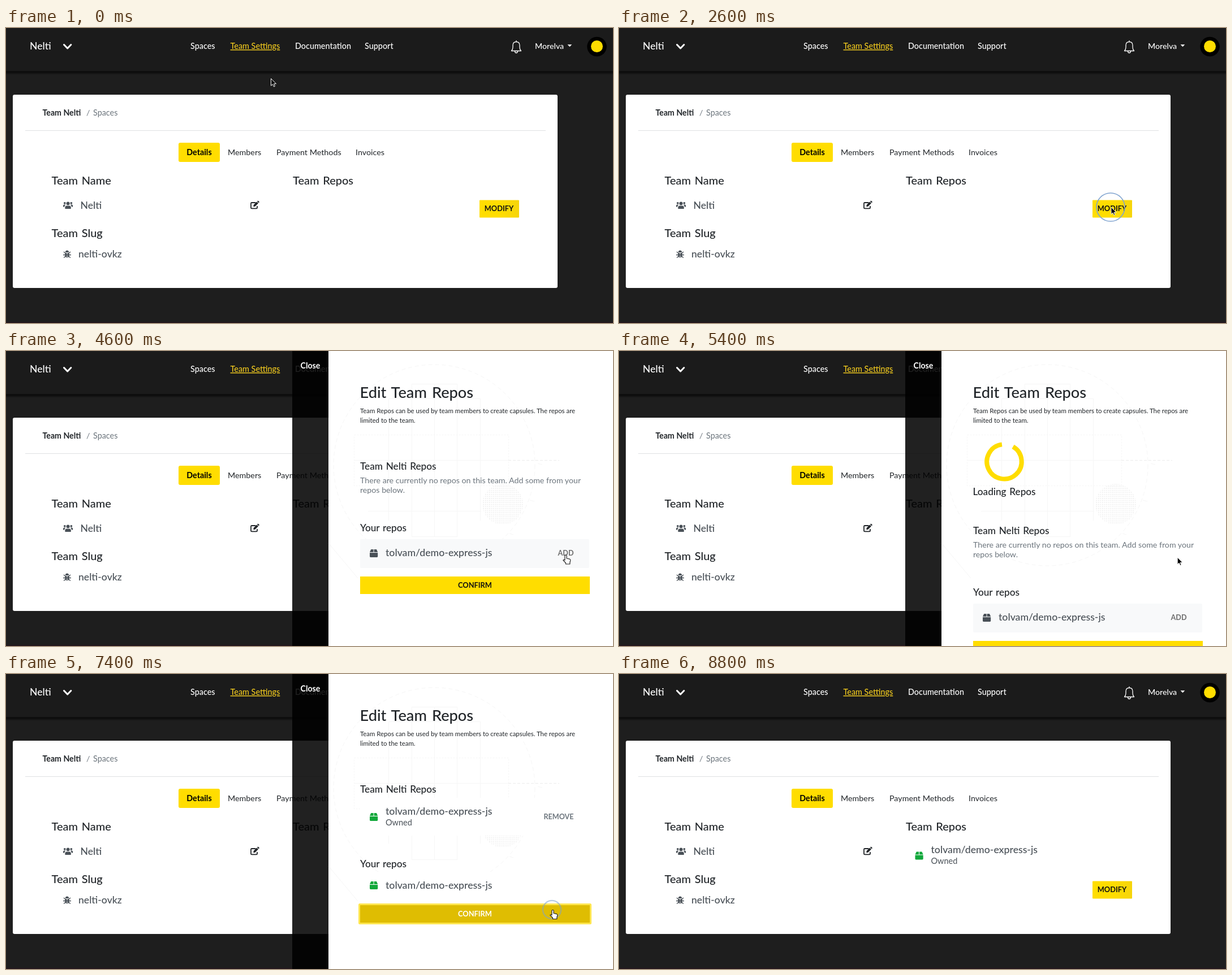
Recreate the animation shown at these times as an HTML page. Size 1073 px wide and 522 px high, loop 9000 ms.

```html
<!DOCTYPE html>
<html lang="en">
<head>
<meta charset="utf-8">
<title>Team repos</title>
<style>
html, body { margin: 0; width: 100%; height: 100%; overflow: hidden; background: #1e1e1e; }
svg { display: block; width: 100%; height: 100%; font-family: Lato, "Open Sans", sans-serif; }
text { white-space: pre; }
</style>
</head>
<body>
<svg id="stage" viewBox="0 0 1073 522"></svg>
<script>
const LOOP = 9000;
const TEAM = "Nelti", REPO = "tolvam/demo-express-js";
const YELLOW = "#ffdd00", INK = "#212529", SLATE = "#495057", GREEN = "#12a83b";
const stage = document.getElementById("stage");

function add(parent, tag, attrs) {
  const node = document.createElementNS("http://www.w3.org/2000/svg", tag);
  for (const key in attrs) node.setAttribute(key, attrs[key]);
  parent.appendChild(node);
  return node;
}
const group = (parent, attrs) => add(parent, "g", attrs);
const rect = (parent, x, y, width, height, fill, more) =>
  add(parent, "rect", { x, y, width, height, fill, ...more });
const path = (parent, d, more) => add(parent, "path", { d, ...more });
const circle = (parent, cx, cy, r, more) => add(parent, "circle", { cx, cy, r, ...more });
function text(parent, x, y, size, str, fill, more) {
  const node = add(parent, "text", { x, y, "font-size": size, fill, ...more });
  node.textContent = str;
  return node;
}
const MEDIUM = { "font-weight": 500 }, BOLD = { "font-weight": 700 };
const MID_BOLD = { "font-weight": 700, "text-anchor": "middle" };

const heading = (parent, x, y, size, str, more) =>
  text(parent, x, y, size, str, INK, { "word-spacing": size * 0.08, ...MEDIUM, ...more });
const show = (node, on) => node.setAttribute("display", on ? "inline" : "none");
const move = (node, x, y) => node.setAttribute("transform", `translate(${x} ${y})`);

function box(parent, x, y, fill) {
  path(parent, "M2.2 0H6.6V5H0ZM7.6 0H12L14.2 5H7.6ZM0 6H14.2V12.6Q14.2 14 12.8 14H1.4Q0 14 0 12.6Z",
    { fill, transform: `translate(${x} ${y})` });
}

function spinner(parent, cx, cy) {
  const r = 30.7, a = 19 * Math.PI / 180;
  const x = r * Math.sin(a), y = -r * Math.cos(a);
  const g = group(parent, { transform: `translate(${cx} ${cy})` });
  return path(g, `M${x} ${y}A${r} ${r} 0 1 1 ${-x} ${y}`,
    { fill: "none", stroke: YELLOW, "stroke-width": 8 });
}

const defs = add(stage, "defs", {});
const shade = add(defs, "linearGradient", { id: "shade" });
add(shade, "stop", { offset: 0.5, "stop-color": YELLOW });
add(shade, "stop", { offset: 1, "stop-color": "#f6d50c" });
const dots = add(defs, "pattern", { id: "dots", width: 3.6, height: 3.6, patternUnits: "userSpaceOnUse" });
circle(dots, 1.8, 1.8, 0.7, { fill: "#d6d6d6" });

// Page header
rect(stage, 0, 0, 1073, 522, "#1e1e1e");
rect(stage, 0, 0, 1073, 76, "#1b1b1b");
rect(stage, 0, 76, 1073, 4, "#0e0e0e");
rect(stage, 0, 80, 1073, 2, "#181818");
rect(stage, 0, 520, 1073, 2, "#23161b");
text(stage, 42, 38, 17.6, TEAM, "#fff", MEDIUM);
path(stage, "M102.5 29.5L108.7 36L114.9 29.5",
  { fill: "none", stroke: "#fff", "stroke-width": 3, "stroke-linecap": "round", "stroke-linejoin": "round" });
text(stage, 326, 37, 14.4, "Spaces", "#fff", MEDIUM);
text(stage, 396.5, 37, 14.4, "Team Settings", "#f0c91e", { ...MEDIUM, "text-decoration": "underline" });
text(stage, 511, 37, 14.4, "Documentation", "#fff", MEDIUM);
text(stage, 634, 37, 14.4, "Support", "#fff", MEDIUM);
path(stage, "M893.5 40.5Q896 38 896 34V30.5Q896 24.5 902 24.5Q908 24.5 908 30.5V34Q908 38 910.5 40.5ZM902 24.5V22M899.5 41Q899.5 44 902 44Q904.5 44 904.5 41",
  { fill: "none", stroke: "#fff", "stroke-width": 1.3, "stroke-linejoin": "round" });
text(stage, 935, 37, 14.2, "Morelva", "#fff", MEDIUM);
path(stage, "M992.5 29.3H1000.3L996.4 33.3Z", { fill: "#fff" });
circle(stage, 1044.5, 33, 17.3, { fill: "#000" });
circle(stage, 1044.5, 32.5, 10.5, { fill: YELLOW });

// Team card
const card = rect(stage, 12, 118, 963, 342, "#fff", { rx: 3 });
text(stage, 64.5, 154.5, 14.2, "Team " + TEAM, INK, BOLD);
text(stage, 142, 154.5, 14.3, "/", "#6c757d");
text(stage, 154, 154.5, 14.4, "Spaces", "#6c757d");
rect(stage, 34, 181, 920, 1, "#dfe1e3");
rect(stage, 305, 203, 73, 34, YELLOW, { rx: 3 });
text(stage, 341.5, 224.5, 14.3, "Details", "#000", MID_BOLD);
[[392, "Members"], [478, "Payment Methods"], [618, "Invoices"]]
  .forEach(([x, label]) => text(stage, x, 224.5, 14.3, label, INK));
heading(stage, 80.5, 277, 20, "Team Name");
heading(stage, 80.5, 369.5, 20, "Team Slug");
heading(stage, 507, 277, 20, "Team Repos");
text(stage, 131.5, 319.5, 17.6, TEAM, SLATE, MEDIUM);
text(stage, 128, 405.5, 17.6, "nelti-ovkz", SLATE, MEDIUM);

const users = group(stage, { fill: SLATE });
circle(users, 109.6, 310.5, 3);
circle(users, 103.8, 309.8, 1.9);
circle(users, 115.4, 309.8, 1.9);
path(users, "M104.4 320V317.5Q104.4 314.5 107.4 314.5H111.8Q114.8 314.5 114.8 317.5V320ZM101 316.5V314.5Q101 312.5 103 312.5H105.5Q103.5 314 103.3 316.5ZM118.2 316.5V314.5Q118.2 312.5 116.2 312.5H113.7Q115.7 314 115.9 316.5Z");

const bug = group(stage, { fill: SLATE, stroke: SLATE });
path(bug, "M104.8 397Q104.8 393.5 108 393.5Q111.2 393.5 111.2 397Z", { stroke: "none" });
path(bug, "M104.3 398H107.5V406.5Q104.3 405.5 104.3 402ZM108.5 398H111.7V402Q111.7 405.5 108.5 406.5Z", { stroke: "none" });
path(bug, "M102 396L105 398.5M101 401.5H115M102.2 406.5L105 404M114 396L111 398.5M113.8 406.5L111 404", { "stroke-width": 1.4, fill: "none" });

path(stage, "M441.5 309H434.5Q433 309 433 310.5V318Q433 319.3 434.5 319.3H442.5Q444 319.3 444 318V315",
  { fill: "none", stroke: INK, "stroke-width": 1.8 });
path(stage, "M437.3 316.3L437.7 313L443.3 307.4L446 310.1L440.4 315.8ZM444 306.7L445.1 305.8Q445.6 305.5 446.2 306L447.5 307.3Q448 307.9 447.5 308.5L446.7 309.4Z", { fill: INK });

const modify = group(stage);
rect(modify, 837, 0, 70, 31, "url(#shade)", { rx: 1 });
text(modify, 871.5, 19.5, 12.8, "MODIFY", "#111", MID_BOLD);

const cardLoader = group(stage);
const cardSpin = spinner(cardLoader, 706.3, 333.3);
heading(cardLoader, 706, 392.5, 17.2, "Loading Repos", { "text-anchor": "middle" });

const cardRepo = group(stage);
box(cardRepo, 523.5, 314.5, GREEN);
text(cardRepo, 551.5, 316.5, 17.7, REPO, SLATE, MEDIUM);
text(cardRepo, 551.5, 335.5, 14.5, "Owned", SLATE);

// Side panel
const panel = group(stage);
rect(panel, 506, 0, 64, 522, "#000", { "fill-opacity": 0.87 });
text(panel, 538, 31, 14.2, "Close", "#fff", MID_BOLD);
rect(panel, 570, 0, 503, 522, "#fff");

const art = group(panel, { fill: "none", stroke: "#f6f6f6" });
circle(art, 757, 202, 178, { "stroke-dasharray": "7 5" });
rect(art, 615.5, 148.5, 273, 90, "none", { "stroke-dasharray": "3 2" });
rect(art, 717.5, 58.5, 80, 270, "none");
path(art, "M757.5 58V329M640 283.5H840M676.5 84V300M838.5 84V300M676 84.5H838M615 193.5H888");
path(art, "M888 193.5H978", { "stroke-dasharray": "5 3", stroke: "#ececec" });
path(art, "M570 340L622 402M940 199l8 2M926 264l8 2M890 323l7 2");
circle(art, 878, 271, 36, { fill: "url(#dots)", stroke: "none" });

heading(panel, 625.5, 83, 27.2, "Edit Team Repos");
text(panel, 626, 110, 11.4, "Team Repos can be used by team members to create capsules. The repos are", INK);
text(panel, 626, 126.5, 11.4, "limited to the team.", INK);

const loader = group(panel);
const panelSpin = spinner(loader, 681, 195.8);
heading(loader, 625.5, 255, 17.2, "Loading Repos");

const lists = group(panel);
heading(lists, 626, 210, 17.2, `Team ${TEAM} Repos`);
const none = group(lists);
text(none, 626, 234, 14.2, "There are currently no repos on this team. Add some from your", "#6c757d");
text(none, 626, 250.5, 14.2, "repos below.", "#6c757d");
const owned = group(lists);
rect(owned, 626, 219, 406, 67, "#fff");
box(owned, 643, 246, GREEN);
text(owned, 671, 248.5, 17.7, REPO, SLATE, MEDIUM);
text(owned, 671, 267.5, 14.5, "Owned", SLATE);
text(owned, 1003.5, 257, 12.6, "REMOVE", "#6c757d", { ...BOLD, "text-anchor": "end" });

const yours = group(lists);
heading(yours, 626, 319, 17.2, "Your repos");
const rowFree = group(yours), rowTaken = group(yours);
rect(rowFree, 626, 333, 405, 51, "#f8f9fa", { rx: 2 });
box(rowFree, 643, 351, SLATE);
text(rowFree, 1003.5, 362, 12.6, "ADD", "#6c6c6c", { ...BOLD, "text-anchor": "end" });
rect(rowTaken, 626, 327, 405, 50, "#fff");
box(rowTaken, 643, 344, GREEN);
const repoName = text(yours, 671, 363, 17.7, REPO, SLATE, MEDIUM);
const confirm = group(yours);
const glow = rect(confirm, 623, -3, 412, 37, "#ffe650", { rx: 2.5 });
const confirmFill = rect(confirm, 626, 0, 406, 31, YELLOW);
const confirmText = text(confirm, 829, 19.5, 12.8, "CONFIRM", "#111", MID_BOLD);

// Pointer
const ring = circle(stage, 0, 0, 0, { fill: "none", stroke: "#7fa3cf" });
const pointer = group(stage, { "stroke-linejoin": "round" });
const arrow = path(pointer, "M0 0V12.6L2.9 9.9L4.9 14.4L6.9 13.5L5 9.2H9Z",
  { fill: "#000", stroke: "#fff", "stroke-width": 1 });
const hand = path(pointer, "M-1.6 1.6A1.6 1.6 0 0 1 1.6 1.6V6L7 7.2Q8.5 7.7 8.3 9.2L7.3 13.5V16H0V14L-4.6 9.3Q-3.6 7.4-1.6 9.2Z",
  { fill: "#fff", stroke: "#222", "stroke-width": 1.2 });

// Pointer stops: time, x, y
const STOPS = [
  [0, 468.5, 89.5], [600, 468.5, 89.5], [2000, 870, 317], [3400, 870, 317],
  [4400, 989.5, 361], [5300, 989.5, 361], [6200, 922, 479], [6700, 922, 479],
  [7150, 966.5, 417.5], [LOOP, 966.5, 417.5]
];
const CLICKS = [[2388, 869, 317], [4950, 989, 361], [7300, 965, 417]];
const CLICK_MS = 400;

const clamp = v => Math.min(1, Math.max(0, v));
const ease = u => u * u * (3 - 2 * u);
const within = (t, a, b) => t >= a && t < b;

function pointerAt(t) {
  const i = STOPS.findIndex(s => s[0] > t);
  const [t0, x0, y0] = STOPS[i - 1], [t1, x1, y1] = STOPS[i];
  const u = ease((t - t0) / (t1 - t0));
  return [x0 + (x1 - x0) * u, y0 + (y1 - y0) * u];
}

function drawCard(t) {
  const loading = within(t, 7500, 8600), loaded = t >= 8600;
  card.setAttribute("height", loading ? 374 : 342);
  show(cardLoader, loading);
  show(cardRepo, loaded);
  move(modify, 0, loading ? 418.5 : loaded ? 366.5 : 304.5);
  cardSpin.setAttribute("transform", `rotate(${(t - 7800) * 0.36 - 24})`);
}

function drawPanel(t) {
  const open = ease(clamp((t - 2750) / 350)) - ease(clamp((t - 7480) / 270));
  show(panel, open > 0);
  move(panel, 567 * (1 - open), 0);

  const loading = within(t, 2750, 4000) || within(t, 5200, 6800);
  const added = t >= 6800, hover = t >= 7080;
  show(loader, loading);
  panelSpin.setAttribute("transform", `rotate(${(t - 6400) * 0.36 + 11})`);
  move(lists, 0, loading ? 114 : 0);
  show(none, !added);
  show(owned, added);
  show(rowFree, !added);
  show(rowTaken, added);
  move(yours, 0, added ? 23 : 0);
  repoName.setAttribute("y", added ? 356.5 : 363);
  move(confirm, 0, added ? 386 : 399);
  show(glow, t >= 7300);
  confirmFill.setAttribute("fill", hover ? "#dfbd02" : YELLOW);
  confirmText.setAttribute("fill", hover ? "#fff" : "#111");
}

function drawPointer(t) {
  const [x, y] = pointerAt(t);
  const pointing = within(t, 4300, 5350) || within(t, 7080, 7550);
  show(pointer, t < 8600);
  move(pointer, x, y);
  show(arrow, !pointing);
  show(hand, pointing);

  const click = CLICKS.find(([at]) => within(t, at, at + CLICK_MS));
  show(ring, click);
  if (!click) return;
  const u = (t - click[0]) / CLICK_MS;
  ring.setAttribute("cx", click[1]);
  ring.setAttribute("cy", click[2]);
  ring.setAttribute("r", 8 + 32 * u);
  ring.setAttribute("stroke-width", 3 - 2.6 * u);
  // Fades in, then out
  ring.setAttribute("opacity", Math.min(1, 2.2 * u, 2.2 * (1 - u)));
}

function draw(t) {
  drawCard(t);
  drawPanel(t);
  drawPointer(t);
}

const start = performance.now();
function tick() {
  draw((performance.now() - start) % LOOP);
  requestAnimationFrame(tick);
}
draw(0);
requestAnimationFrame(tick);
</script>
</body>
</html>
```
